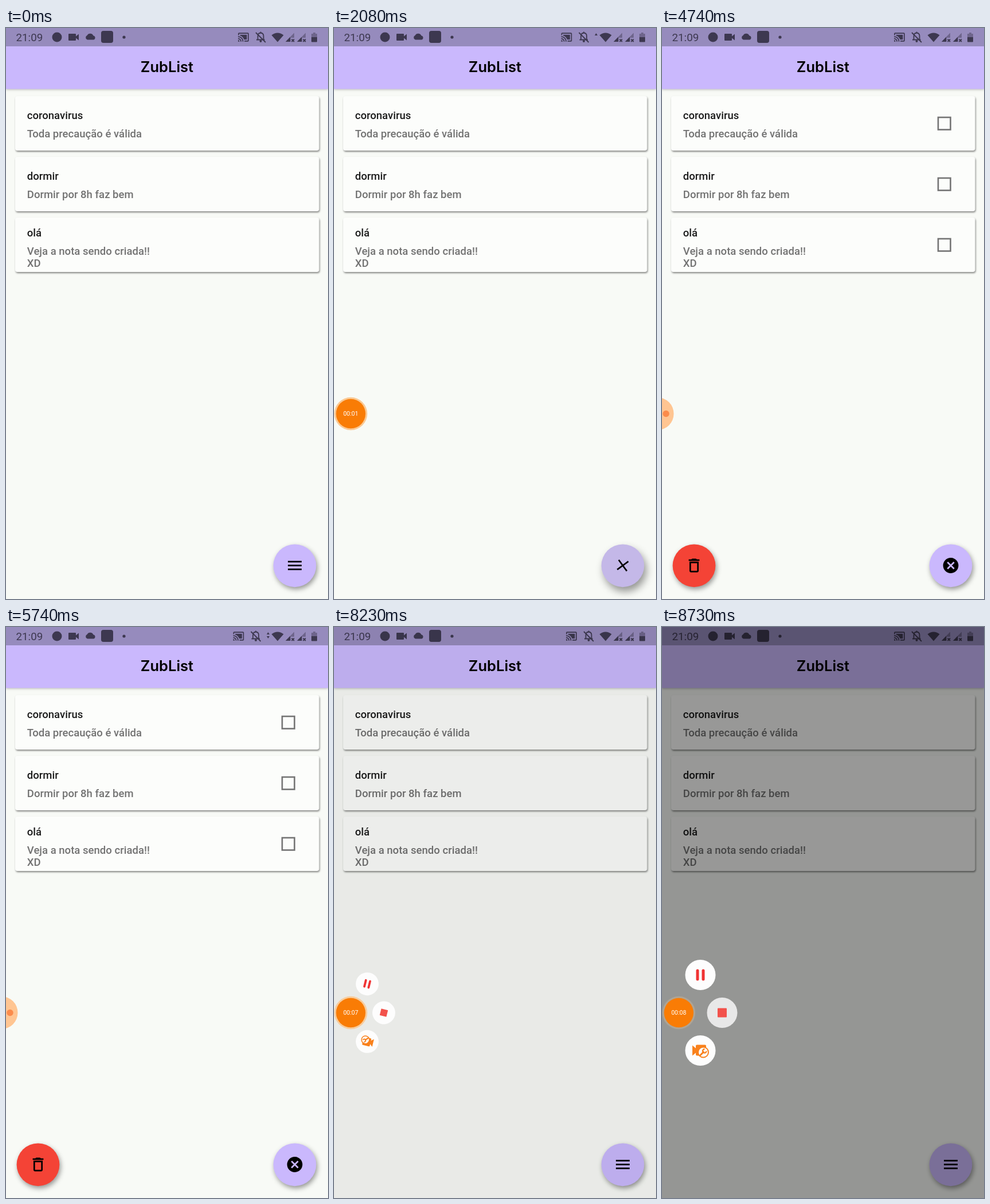
Write an HTML page that moves like this. It is 562 by 997 pixels and loops after 8.81 s.

```html
<!DOCTYPE html>
<html lang="pt">
<head>
<meta charset="utf-8">
<title>ZubList</title>
<style>
  html, body { margin: 0; width: 100%; height: 100%; overflow: hidden; background: #f8faf6; }
  svg { display: block; width: 100%; height: 100%; font-family: Roboto, sans-serif; }
  .card { fill: #fcfdfb; filter: drop-shadow(1.2px 2px 1.8px #0007); }
  .bar { fill: #cab8fd; filter: drop-shadow(0 1px 2px #0004); }
  .head { font: 600 25.5px Inter, sans-serif; }
  .title, .note { font-size: 18.55px; font-weight: 500; }
  .title { fill: #1c1c1c; }
  .note { fill: #727272; }
  .lilac { fill: #cab8fd; }
  .fab { filter: drop-shadow(2px 4px 4px #0006); }
  .fab.pressed { filter: drop-shadow(4px 8px 7px #0006); }
  .pressed .lilac { fill: #c4b8e8; }
  .line { fill: none; stroke: #000; stroke-width: 2.7; }
  .box { fill: none; stroke: #747474; stroke-width: 2.6; }
  .status { fill: #3d3850; stroke: none; }
  .thin { fill: none; stroke: #3d3850; stroke-width: 1.8; }
</style>
</head>
<body>
<svg viewBox="0 0 562 997" preserveAspectRatio="none">
  <rect width="562" height="997" fill="#f8faf6"/>
  <rect class="bar" width="562" height="106.500"/>
  <rect width="562" height="32" fill="#968bbd"/>

  <g class="status">
    <text x="17.500" y="23" font-size="18.800">21:09</text>
    <circle cx="89" cy="16" r="8.500"/>
    <path d="M110 10h11q1 0 1 1v3.500l5-4v11l-5-4v3.500q0 1-1 1h-11q-1 0-1-1v-10q0-1 1-1z"/>
    <path d="M142 20.500a4 4 0 0 1-.5-7.500a6 6 0 0 1 11 .5a3.600 3.600 0 0 1 .5 7z"/>
    <rect x="166" y="5" width="21" height="21" rx="4"/>
    <circle cx="206" cy="16" r="2.600"/>
    <g id="alerts">
      <path transform="translate(404.200 5.800) scale(.85)" d="M1 18v3h3c0-1.660-1.340-3-3-3zm0-4v2c2.760 0 5 2.240 5 5h2c0-3.870-3.130-7-7-7zm18-7H5v1.630c3.960 1.280 7.090 4.410 8.370 8.370H19V7zM1 10v2c4.970 0 9 4.030 9 9h2c0-6.080-4.930-11-11-11zm20-7H3c-1.100 0-2 .9-2 2v3h2V5h18v14h-7v2h7c1.100 0 2-.9 2-2V5c0-1.100-.9-2-2-2z"/>
      <path class="thin" d="M437 20.500h14.500M439.500 20v-6q0-5 5-5.500q5 .5 5 5.500v6M436 8l17 17M444.500 6.500v2"/>
      <circle cx="444.500" cy="23" r="2"/>
    </g>
    <path id="up" d="M455 13l2.500-4l2.500 4z"/>
    <path id="down" d="M455 16l2.500 4l2.500-4z"/>
    <path d="M463.500 12.500q10.500-8 21 0L474 24.500z"/>
    <g id="signal">
      <path d="M488 24L503 8.500V17h-6v7z" opacity=".45"/>
      <path d="M488 24l8-8.300V24z"/>
      <path class="thin" d="M498.500 19.500l4.500 4.500m0-4.500l-4.500 4.500"/>
    </g>
    <use href="#signal" x="20"/>
    <path d="M533 10h3V8h4v2h3v6h-10z" opacity=".45"/>
    <path d="M533 16h10v7.500q0 1-1 1h-8q-1 0-1-1z"/>
  </g>

  <text class="head" x="281" y="77.300" text-anchor="middle">ZubList</text>

  <g id="cards"></g>

  <g id="checks">
    <rect class="box" x="482" y="156" width="21.500" height="21.500"/>
    <rect class="box" x="482" y="262" width="21.500" height="21.500"/>
    <rect class="box" x="482" y="368" width="21.500" height="21.500"/>
    <circle class="fab" cx="56" cy="938.800" r="37.400" fill="#f44336"/>
    <path transform="translate(39.900 922.400) scale(1.340)" fill-rule="evenodd" d="M6 19c0 1.100.9 2 2 2h8c1.100 0 2-.9 2-2V7H6v12zM8 9h8v10H8V9zm7.500-5l-1-1h-5l-1 1H5v2h14V4z"/>
  </g>

  <g id="fab" class="fab">
    <circle class="lilac" cx="504" cy="938.800" r="37.400"/>
  </g>
  <g transform="translate(504 938.500)">
    <g id="menu" class="line">
      <path id="top" d="M-12 0h24"/><path id="mid" d="M-12 0h24"/><path id="low" d="M-12 0h24"/>
    </g>
    <g id="cancel">
      <circle r="13.400"/>
      <path d="M-5.750 -5.750L5.750 5.750M5.750 -5.750L-5.750 5.750" stroke="#cab8fd" stroke-width="2.700"/>
    </g>
  </g>

  <rect id="dim" width="562" height="997"/>

  <g id="dock">
    <circle cy="673.500" cx="-8" r="28.500" fill="#ffc592"/>
    <circle cy="673.500" cx="7" r="5.700" fill="#fb8b4b"/>
  </g>

  <g id="pause" class="item">
    <circle r="26.500" fill="#fdfdfd"/>
    <path d="M-5 -7.500V7.500M5 -7.500V7.500" stroke="#f03333" stroke-width="5" stroke-linecap="round"/>
  </g>
  <g id="stop" class="item">
    <circle id="stopDisc" r="26.500"/>
    <rect x="-8" y="-8" width="16" height="16" rx="1" fill="#f2524b"/>
  </g>
  <g id="tools" class="item">
    <circle r="26.500" fill="#fdfdfd"/>
    <path d="M-14 -9l6 5v-4q0-2 2-2H8q2 0 2 2V7q0 2-2 2H-6q-2 0-2-2V4l-6 5z" fill="#f9811c"/>
    <circle cx="5" cy="3" r="9" fill="#fdfdfd" stroke="#f9811c" stroke-width="2"/>
    <path d="M0 8L5.500 2.500" stroke="#f9811c" stroke-width="3" stroke-linecap="round"/>
    <path d="M7.500 -2.500a3.300 3.300 0 1 0 3 3.500" fill="none" stroke="#f9811c" stroke-width="2.300"/>
  </g>

  <g id="bubble">
    <circle id="halo" r="28.800" fill="#fbc993"/>
    <circle r="25.700" fill="#f97c05"/>
    <text id="clock" y="3.800" fill="#fff" font-size="10.500" text-anchor="middle"></text>
  </g>
</svg>
<script>
const LOOP = 8810;
const $ = id => document.getElementById(id);
const clamp = v => Math.max(0, Math.min(1, v));
const ramp = (t, a, b) => clamp((t - a) / (b - a));
const mix = (a, b, p) => a + (b - a) * p;
const within = (t, a, b) => t >= a && t < b;
const show = (id, on) => $(id).style.display = on ? '' : 'none';
const place = (id, x, y, scale = 1, turn = 0) =>
  $(id).setAttribute('transform', `translate(${x} ${y}) rotate(${turn}) scale(${scale})`);

const notes = [
  [119, 40, 'coronavirus', 'Toda precaução é válida'],
  [225, 40, 'dormir', 'Dormir por 8h faz bem'],
  [331, 33, 'olá', 'Veja a nota sendo criada!!', 'XD']
];
$('cards').innerHTML = notes.map(([y, top, title, ...lines]) =>
  `<rect class="card" x="16" y="${y}" width="530.5" height="95" rx="4"/>
   <text class="title" x="36.8" y="${y + top}">${title}</text>` +
  lines.map((s, i) => `<text class="note" x="36.8" y="${y + top + 31.5 + i * 21.3}">${s}</text>`).join('')
).join('');

// Two outer bars turn into a cross while the middle one fades.
function drawMenu(p) {
  const rest = (1 - p) ** 3, spin = 80 * p * (1 - p), turn = 45 * (1 - rest);
  place('top', 0, -6.7 * rest, 1, turn + spin);
  place('low', 0, 6.7 * rest, 1, spin - turn);
  $('mid').style.opacity = clamp(1 - p * 1.5);
}

function drawBubble(t) {
  const away = ramp(t, 3580, 3740) - ramp(t, 7880, 8040);
  const dim = ramp(t, 8200, 8400);
  show('bubble', t > 500 && away < 1);
  place('bubble', mix(29.3, -5, away), 673.5, mix(1, .5, away));
  $('bubble').style.opacity = mix(1, .2, away);
  $('halo').style.opacity = 1 - .75 * dim;
  $('clock').textContent = '00:0' + Math.max(0, Math.floor((t - 400) / 1000));

  const dock = ramp(away, .5, 1);
  show('dock', dock > 0);
  place('dock', -28 * (1 - dock), 0);

  $('dim').style.opacity = .4 * dim;
  const open = ramp(t, 8080, 8278);
  [['pause', 38, -66], ['stop', 76, 0], ['tools', 38, 66]].forEach(([id, dx, dy]) => {
    show(id, open > 0);
    place(id, 29 + dx * open, 673.5 + dy * open, open * mix(.95, 1, open), -700 * (1 - open));
  });
  $('stopDisc').setAttribute('fill', t > 8560 ? '#e8e8e8' : '#fdfdfd');
}

function draw(t) {
  const picking = within(t, 3100, 6700);
  const up = within(t, 1900, 2900), both = within(t, 5200, 6200);
  show('up', up || both);
  show('down', both);
  place('alerts', up || both ? -8.5 : 0, 0);

  show('checks', picking);
  show('cancel', picking);
  show('menu', !picking);
  $('fab').classList.toggle('pressed', within(t, 1900, 2250));
  drawMenu(t < 3100 ? ramp(t, 1950, 2100) : 0);
  drawBubble(t);
}

const start = performance.now();
function tick() {
  draw((performance.now() - start) % LOOP);
  requestAnimationFrame(tick);
}
tick();
</script>
</body>
</html>
```
